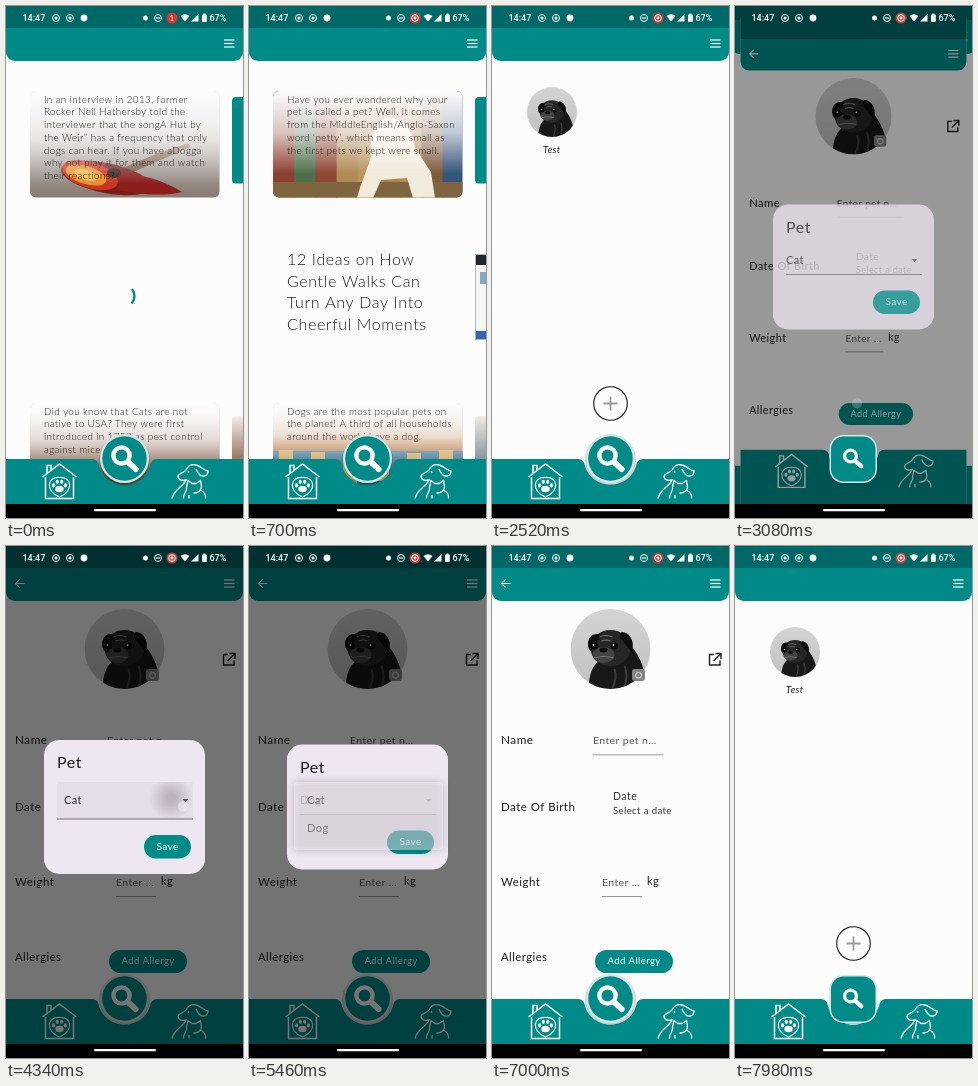
An HTML page with a canvas for the animation above (8000 ms loop, 237x512 px).

```html
<!DOCTYPE html>
<html lang="en">
<head>
<meta charset="utf-8">
<title>Pet app</title>
<style>
html, body { margin: 0; width: 100%; height: 100%; overflow: hidden; background: #fdfcfd; }
canvas { display: block; width: 100%; height: 100%; }
</style>
</head>
<body>
<canvas></canvas>
<script>
const W = 237, H = 512, LOOP = 8000;
const TEAL = '#008b89', INK = '#1c1c1c', PAPER = '#fdfcfd', TAU = Math.PI * 2;
const canvas = document.querySelector('canvas'), c = canvas.getContext('2d');
const clamp = v => Math.max(0, Math.min(1, v));
const easeOut = p => 1 - (1 - p) ** 3;

// ---------- drawing helpers ----------
function text(str, x, y, size, color = INK, style = '', align = 'left') {
  c.font = `${style} ${size}px Lato, sans-serif`;
  c.letterSpacing = size * 0.04 + 'px';
  c.textAlign = align;
  c.fillStyle = color;
  c.fillText(str, x, y + size * 0.31);
}
function lines(list, x, y, size, pitch) {
  list.forEach((s, i) => text(s, x, y + i * pitch, size, INK, '300'));
}
function box(x, y, w, h, r, fill) {
  c.beginPath();
  c.roundRect(x, y, w, h, r);
  c.fillStyle = fill;
  c.fill();
}
function disc(x, y, rx, fill, ry = rx, turn = 0) {
  c.beginPath();
  c.ellipse(x, y, rx, ry, turn, 0, TAU);
  c.fillStyle = fill;
  c.fill();
}
function ring(x, y, r, color, width = 1, from = 0, to = TAU) {
  c.beginPath();
  c.arc(x, y, r, from, to);
  c.strokeStyle = color;
  c.lineWidth = width;
  c.stroke();
}
function path(d, color, width = 1, fill) {
  const p = new Path2D(d);
  if (fill) { c.fillStyle = fill; c.fill(p); }
  if (color) { c.strokeStyle = color; c.lineWidth = width; c.stroke(p); }
}
function fade(y0, y1, ...colors) {
  const g = c.createLinearGradient(0, y0, 0, y1);
  colors.forEach((col, i) => g.addColorStop(i / (colors.length - 1), col));
  return g;
}
function clipped(x, y, w, h, r, paint) {
  c.save();
  c.beginPath();
  c.roundRect(x, y, w, h, r);
  c.clip();
  paint();
  c.restore();
}

// ---------- shared chrome ----------
function magnifier(y, s) {
  c.lineCap = 'round';
  ring(115.5, y - 3, 7.4 * s, '#fff', 4 * s);
  path(`M${115.5 + 6 * s} ${y - 3 + 6 * s}L${117 + 11.5 * s} ${y - 2 + 11.5 * s}`, '#fff', 5.4 * s);
  c.lineCap = 'butt';
}
function roundButton() {
  disc(118.5, 454, 25.5, 'rgba(0,40,40,.22)');
  disc(118.5, 452.5, 24.5, '#d8e6e6');
  disc(118.5, 452.5, 22.3, TEAL);
  magnifier(452.5, 1.1);
}
function flyingButton() {
  box(94.5, 430, 47.5, 48, 14, 'rgba(0,40,40,.25)');
  box(94.5, 429, 47.5, 48, 14, '#d8e6e6');
  box(96, 430.5, 44.5, 45, 12.5, TEAL);
  magnifier(453, 0.8);
}
function houseIcon() {
  path('M36.5 471L53.5 458L70.5 471M41 467V459.5H45V464M39.5 471V492.5H67.5V471', '#fff', 1.5);
  path('M53.5 491C39 485 41 470.5 53.5 471.5C66 470.5 68 485 53.5 491Z', '#fff', 1.2);
  disc(53.5, 483, 4.2, '#fff', 3.3);
  for (const [x, y] of [[47.6, 479.4], [51.3, 475.8], [55.7, 475.8], [59.4, 479.4]]) disc(x, y, 1.6, '#fff', 2.1);
}
function petsIcon() {
  path('M172 470C173 467 178 467 180 464C182 460 186 458 190 459C195 460 197 464 202 465C202 470 196 472 193 468C191 466 190.5 464 190 463M172 470C172 474 176 475 180 474C177 481 168 483 166 492.5', '#fff', 1.3);
  path('M177.5 492.5C177 487 182 485 180.5 481L182 474.5L186 477.5H190L194.5 474.5L195.5 481C195 486 190 487 187.5 487M194 484C199 486 200 489 199.5 492.5M183 489V492.5', '#fff', 1.3);
  disc(182.5, 466, 0.9, '#fff');
}
function chrome(back, withButton) {
  box(0, 0, W, 55, [0, 0, 9, 9], TEAL);
  box(0, 0, W, 22, 0, '#006967');
  for (const y of [34, 37.5, 41]) box(218, y - 0.6, 10.5, 1.2, 0, '#fff');
  if (back) path('M18.5 37.5H9.5M13.7 33.3L9.5 37.5L13.7 41.7', '#fff', 1.2);
  c.beginPath();
  c.moveTo(0, 453);
  c.lineTo(86, 453);
  c.quadraticCurveTo(92, 453, 93, 460);
  c.arc(118.5, 452, 26.8, 2.84, 0.3, true);
  c.quadraticCurveTo(145, 453, 151, 453);
  c.lineTo(W, 453);
  c.lineTo(W, H);
  c.lineTo(0, H);
  c.fillStyle = TEAL;
  c.fill();
  houseIcon();
  petsIcon();
  if (withButton) roundButton();
}

function pug(x, y, r) {
  clipped(x - r, y - r, 2 * r, 2 * r, r, () => {
    c.translate(x, y);
    c.scale(r / 40, r / 40);
    box(-40, -40, 80, 80, 0, fade(-40, 40, '#d4d4d4', '#c0c0c0'));
    path('M-22 42C-22 26 -18 14 -8 10L20 -4C32 10 36 26 35 42Z', null, 0, '#181818');
    disc(0, -1, 20, '#262626', 18);
    path('M-14 -15C-22 -15 -25 -4 -20 2L-9 -13ZM11 -17C20 -17 25 -6 21 3L9 -12Z', null, 0, '#0d0d0d');
    disc(-7, 6, 11, '#454545', 8);
    disc(-7, 1, 4, '#0a0a0a', 2.5);
    for (const ex of [-16, 4]) { disc(ex, -3, 3.6, '#080808'); disc(ex - 1, -4, 1, '#ddd'); }
    path('M-16 9Q-7 6 3 9M-11 -12Q-5 -15 2 -12M-9 -8Q-4 -10 0 -8', '#777', 1.2);
    path('M4 20Q7 29 2 39M14 17Q18 27 14 37', '#3c3c3c', 2);
  });
}

// ---------- feed ----------
function guitarPhoto() {
  box(24, 85, 190, 107, 0, fade(85, 192, '#d9d5d0', '#b5aea8', '#867c74'));
  path('M112 164L150 148L183 137L184 141L116 171Z', null, 0, '#74553f');
  disc(100, 172, 46, '#7d1b1a', 15, 0.2);
  path('M108 168C130 166 158 174 176 186C158 191 130 188 112 184Z', null, 0, '#8d1d1b');
  disc(84, 169, 29, '#c8371f', 13, 0.3);
  disc(80, 169, 21, '#e8902e', 9, 0.3);
  disc(80, 169, 12, '#f2bd55', 5, 0.3);
  disc(108, 167, 7, '#30201b', 5);
}
function cartoonPhoto() {
  ['#8a3f30', '#4f6f4c', '#8d4633', '#b08a54', '#b8935c', '#ab854f', '#b08a54', '#7c5a3a', '#35557a']
    .forEach((col, i) => box(24 + i * 21.2, 85, 22, 107, 0, col));
  box(24, 176, 190, 16, 0, '#7f6440');
  path('M108 192C112 176 118 166 122 150C120 130 126 112 140 112C154 112 164 124 166 142L182 166L186 192H164L158 172L132 174L124 192Z', null, 0, '#f2ebdc');
}
function factCard(y, h, paint, copy, veilEnd) {
  clipped(24, y, 189.5, h, 6, () => {
    paint();
    box(24, y, 190, h, 0, fade(y, veilEnd, PAPER, 'rgba(253,252,253,.7)', 'rgba(253,252,253,0)'));
  });
  lines(copy, 38, y + 8.5, 9.8, 12.75);
}
function feed(t) {
  const loaded = t >= 630;
  if (!loaded) {
    factCard(85, 106.5, guitarPhoto, [
      'In an interview in 2013, former', 'Rocker Neil Hathersby told the',
      'interviewer that the songA Hut by', 'the Weir” has a frequency that only',
      'dogs can hear. If you have aDogga', 'why not play it for them and watch',
      'their reactions?'], 178);
    factCard(397, 100, () => box(24, 397, 190, 100, 0, fade(410, 490, '#cdbfb5', '#8a6652', '#4c3026')), [
      'Did you know that Cats are not', 'native to USA? They were first',
      'introduced in 1750 as pest control', 'against mice'], 470);
    const a = t / 1000 * 5.2;
    ring(117.5, 290, 11, TEAL, 2.4, a - 0.7, a + 0.75 + 0.6 * Math.sin(t / 200) ** 2);
  } else {
    factCard(85, 106.5, cartoonPhoto, [
      'Have you ever wondered why your', 'pet is called a pet? Well, it comes',
      'from the MiddleEnglish/Anglo-Saxon', 'word ‘petty’, which means small as',
      'the first pets we kept were small.'], 168);
    factCard(397, 100, () => {
      box(24, 397, 190, 100, 0, fade(410, 470, '#d8c9ae', '#bb793e', '#235e7e'));
      box(24, 445, 190, 30, 0, '#3a7390');
      for (let i = 0; i < 6; i++) box(30 + i * 32, 444 + i * 7 % 5, 14, 30, 0, '#d0a45c');
    }, [
      'Dogs are the most popular pets on', 'the planet! A third of all households',
      'around the world have a dog.'], 462);
    lines(['12 Ideas on How', 'Gentle Walks Can', 'Turn Any Day Into', 'Cheerful Moments'], 38, 254.5, 16, 21.4);
    box(226, 248, 20, 86, 0, '#a9b6c2');
    box(227, 249, 20, 84, 0, '#f5f5f3');
    box(227, 249, 20, 10, 0, '#23262e');
    box(231, 266, 8, 12, 0, '#86a6c2');
    box(227, 325, 20, 8, 0, '#2f66b5');
  }
  box(226, 91, 20, 86.5, 4, TEAL);
  box(226, 410, 20, 80, 4, loaded ? fade(410, 455, '#f0ebe5', '#86939a') : fade(410, 455, '#f2eeea', '#9a6f58'));
}

// ---------- pet list and pet details ----------
function list() {
  pug(60, 106, 25);
  text('Test', 59.8, 144, 9.5, INK, 'italic', 'center');
  ring(118.5, 397.5, 16.8, '#111', 1.1);
  path('M111.5 397.5H125.5M118.5 390.5V404.5', '#9b9b9b', 1.8);
}
function field(hint, x, y, w) {
  text(hint, x, y, 10.4, '#555');
  box(x, y + 13.5, w, 0.8, 0, '#777');
}
function detail() {
  pug(118.5, 103, 40);
  box(140, 123, 13, 12, 3, '#858585');
  ring(146.5, 129.3, 2.8, '#c9c9c9', 1.2);
  path('M222 108.5H217.5V119H228V114.5M223.5 107.5H229V113M229 107.5L221.5 115', INK, 1.4);
  text('Name', 9, 194.5, 11.8);
  field('Enter pet n…', 101, 195, 70);
  text('Date Of Birth', 9, 261, 11.5);
  text('Date', 121, 251, 10.6, '#333');
  text('Select a date', 121, 265, 9.6, '#333');
  text('Weight', 9, 336, 11.5);
  field('Enter …', 110, 336.5, 40);
  text('kg', 155, 335.5, 11);
  text('Allergies', 9, 411.5, 11.3);
  box(103, 404, 78, 23, 11.5, TEAL);
  text('Add Allergy', 142, 415.5, 9.6, '#fff', '', 'center');
}

// ---------- dialog ----------
const PICK = 5400;
function dialog(t) {
  const alpha = clamp(Math.min((t - 2970) / 150, (6470 - t) / 150));
  if (!alpha) return;
  c.save();
  c.globalAlpha = alpha;
  c.fillStyle = 'rgba(0,0,0,.54)';
  c.fillRect(0, 0, W, H);
  const tall = t >= 4250 && t < PICK, grow = tall ? 4.5 : 0;
  const pet = t < PICK ? 'Cat' : 'Dog';
  box(38, 198.5 - grow, 161, 125 + 2 * grow, 15, '#eee6f1');
  text('Pet', 51, 222 - grow, 16);
  if (tall) box(51, 236, 136, 37, [3, 3, 0, 0], '#e5dde8');
  text(pet, tall ? 58 : 51, 255, 11, '#333');
  box(51, tall ? 272.5 : 268, 136, 0.9, 0, '#756f78');
  path('M176.5 253H182.5L179.5 256Z', null, 0, '#555');
  box(138, 284.5 + grow, 47, 23.5, 11.75, TEAL);
  text('Save', 161.5, 296 + grow, 10, '#fff', '', 'center');
  if (t > 4230 && t < 4520) {
    const g = c.createRadialGradient(165, 252, 4, 165, 252, 22);
    g.addColorStop(0, 'rgba(80,70,80,.28)');
    g.addColorStop(1, 'rgba(80,70,80,0)');
    clipped(51, 236, 136, 37, 0, () => disc(165, 252, 22, g));
  }
  menu(t);
  c.restore();
}
function menu(t) {
  const open = clamp(Math.min((t - 4480) / 250, (PICK + 120 - t) / 120));
  if (!open) return;
  const height = 36 + 32 * easeOut(clamp((t - 4480) / 300));
  c.globalAlpha = open;
  c.shadowColor = 'rgba(0,0,0,.4)';
  c.shadowBlur = 8;
  box(45, 236, 149, height, 3, '#f3edf5');
  c.shadowColor = 'transparent';
  clipped(45, 236, 149, height, 3, () => {
    box(45, 241, 149, 28, 0, '#e1dbe3');
    text('Cat', 58, 255, 11);
    text('Dog', 58, 283, 11);
  });
}

// ---------- system overlay ----------
function system(t) {
  const label = (s, x) => {
    c.font = '500 9px Roboto, sans-serif';
    c.letterSpacing = '0px';
    c.textAlign = 'left';
    c.fillStyle = '#fff';
    c.fillText(s, x, 15.3);
  };
  label('14:47', 16.5);
  for (const x of [50, 64]) { ring(x, 12, 3.5, '#fff'); disc(x, 12, 1.5, '#fff'); }
  disc(78, 12, 3.4, '#fff');
  disc(139.5, 12, 2.5, '#fff');
  ring(152, 12, 3.5, '#fff');
  path('M150 12H154', '#fff', 1.2);
  if (t < 500) {
    disc(166, 12, 5.6, '#e0342f');
    text('1', 166, 12.2, 8, '#fff', '', 'center');
  } else {
    disc(166, 12, 5.6, '#b8483f');
    ring(166, 12, 3.3, '#fff', 0.9);
    disc(166, 12, 1.4, '#fff');
  }
  path('M174.5 10Q179 6.5 183.5 10L179 15.5Z', null, 0, '#fff');
  path('M185 15.5L192.5 8V15.5Z', null, 0, '#fff');
  box(196, 8.5, 4.8, 7.5, 0.8, '#fff');
  box(197.4, 7.5, 2, 1.5, 0, '#fff');
  label('67%', 203.5);
  box(0, 498, W, 14, 0, '#000');
  box(88, 503, 62, 2.3, 1.1, '#fff');
}

// x, y, press time, release time
const TOUCHES = [[191, 477, 1150, 1380], [122, 397, 2850, 3110], [177, 260.5, 4230, 4460],
  [75, 284, 5230, 5450], [171, 308, 6230, 6450], [14, 38, 7540, 7760]];
function touches(t) {
  for (const [x, y, from, to] of TOUCHES) {
    const a = clamp(Math.min((t - from) / 50, (to - t) / 80));
    if (a) disc(x, y, 5.2, `rgba(235,235,235,${0.65 * a})`);
  }
}

// ---------- navigation ----------
const FLIGHT = 300;
const MOVES = [
  { at: 1330, from: feed, to: list },
  { at: 2985, from: list, to: detail },
  { at: 7690, from: detail, to: list, pop: true },
];
function page(paint, t, scale = 1, alpha = 1, withButton = false) {
  if (!alpha) return;
  c.save();
  c.globalAlpha = alpha;
  c.translate(W / 2, H / 2);
  c.scale(scale, scale);
  c.translate(-W / 2, -H / 2);
  box(0, 0, W, H, 0, PAPER);
  paint(t);
  chrome(paint === detail, withButton);
  c.restore();
}
function draw(t) {
  const move = MOVES.findLast(m => t >= m.at);
  const p = move ? (t - move.at) / FLIGHT : 1, flying = p < 1;
  if (!flying) page(move ? move.to : feed, t, 1, 1, true);
  else {
    const e = easeOut(p);
    if (move.pop) {
      page(move.to, t, 1.05 - 0.05 * e);
      page(move.from, t, 1 - 0.1 * e, 1 - clamp(p * 2.5));
    } else {
      page(move.from, t, 1 + 0.05 * e);
      page(move.to, t, 0.85 + 0.15 * e, clamp(p * 4));
    }
  }
  dialog(t);
  if (flying) flyingButton();
  touches(t);
  system(t);
}

function frame() {
  const dpr = devicePixelRatio || 1;
  const w = Math.round(innerWidth * dpr), h = Math.round(innerHeight * dpr);
  if (canvas.width !== w || canvas.height !== h) { canvas.width = w; canvas.height = h; }
  c.setTransform(w / W, 0, 0, h / H, 0, 0);
  draw(performance.now() % LOOP);
  requestAnimationFrame(frame);
}
frame();
</script>
</body>
</html>
```
